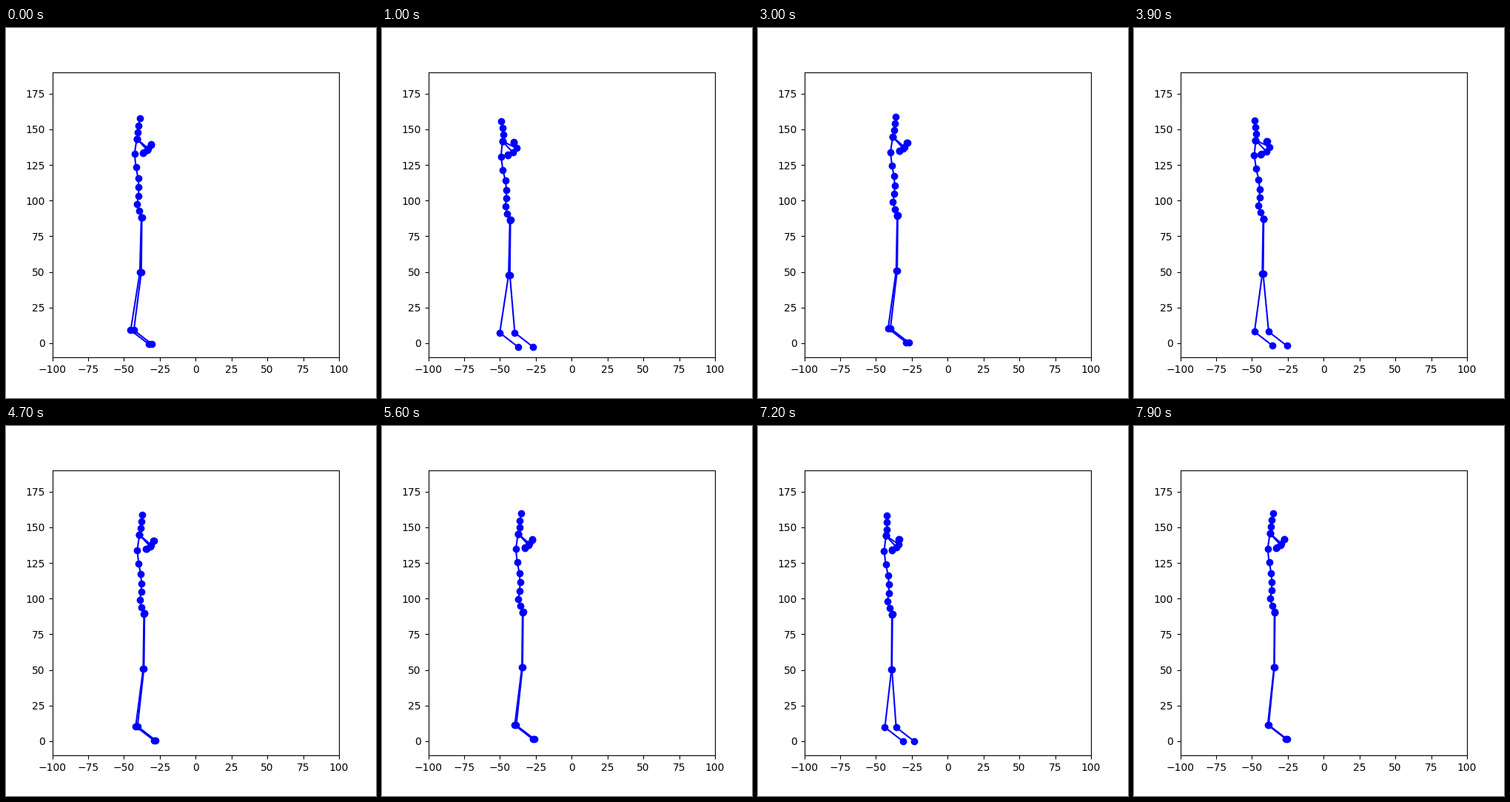
These frames come from a looping animation (500x500 px, 8 s). A matplotlib script:

```python
import numpy as np
import matplotlib.pyplot as plt
from matplotlib.animation import FuncAnimation

FRAMES, STEP = 80, 100
SWAYS = np.array([-0.8, 0.9, 3.8, 6.75])  # moments (s) of the deepest sway

# Standing pose: spine from head to pelvis relative to the hip
SPINE = np.array([(-1.2, 69.3), (-2.0, 64.6), (-2.4, 59.8), (-3.3, 55.2),
                  (-4.9, 44.6), (-3.9, 35.2), (-2.4, 27.5), (-1.9, 21.0),
                  (-2.2, 15.1), (-3.1, 9.4), (-1.8, 4.5), (0, 0)])
NECK = 3
KNEE, ANKLE = 38.7, 79.2  # drop below the hip
FOOT = np.array([12.7, -9.9])

# Elbow and hand relative to the neck, each with its shift when leaning
ARMS = [
    (((7.3, -8.0), (0, 0.2)), ((4.5, -10.0), (-1, 0.2))),
    (((8.0, -7.0), (1.8, 2.3)), ((9.8, -4.2), (-2.1, 3.4))),
]


def pulse(t, rise, fall, power=2, delay=0):
    """Sum of one bump per sway, with separate widths before and after."""
    u = t - SWAYS - delay
    width = np.where(u < 0, rise, fall)
    return np.exp(-np.abs(u / width) ** power).sum()


def limbs(t):
    p = t / 8
    drift = p * p * (3 - 2 * p)
    dip = 7.5 * pulse(t, 0.29, 0.71)
    lean = pulse(t, 0.32, 0.5, 3)
    stride = 2.2 - 0.2 * t + 9.2 * pulse(t, 0.28, 0.28, 4, delay=0.25)
    hip = np.array([-35.6 + 2 * drift - dip, 89 + 1.7 * drift - 0.36 * dip])

    # The lean bends the trunk steadily and tips the head further
    height = SPINE[:, 1] / SPINE[0, 1]
    spine = hip + SPINE
    spine[:, 0] -= lean * (2.3 * height + 2.6 * height ** 10)

    parts = [spine]
    for arm in ARMS:
        joints = [np.add(pos, lean * np.array(shift)) for pos, shift in arm]
        parts.append(spine[NECK] + np.array([(0, 0), *joints, joints[-1] + 0.3]))

    rear = -7.6 + 0.35 * t
    for side, knee, ankle in ((-0.2, -1.2 + 0.1 * t, rear),
                              (0.2, -0.2, rear + stride)):
        heel = np.array([ankle, -ANKLE])
        parts.append(hip + np.array([(side, side), (knee, -KNEE), heel, heel + FOOT]))
    return parts


fig, ax = plt.subplots(figsize=(5, 5), dpi=100)
ax.set_xlim(-100, 100)
ax.set_ylim(-10, 190)
lines = [ax.plot([], [], "bo-")[0] for _ in range(5)]


def update(frame):
    for line, joints in zip(lines, limbs(frame * STEP / 1000)):
        line.set_data(*joints.T)
    return lines


anim = FuncAnimation(fig, update, frames=FRAMES, interval=STEP,
                     repeat=True, repeat_delay=0)
plt.show()
```
